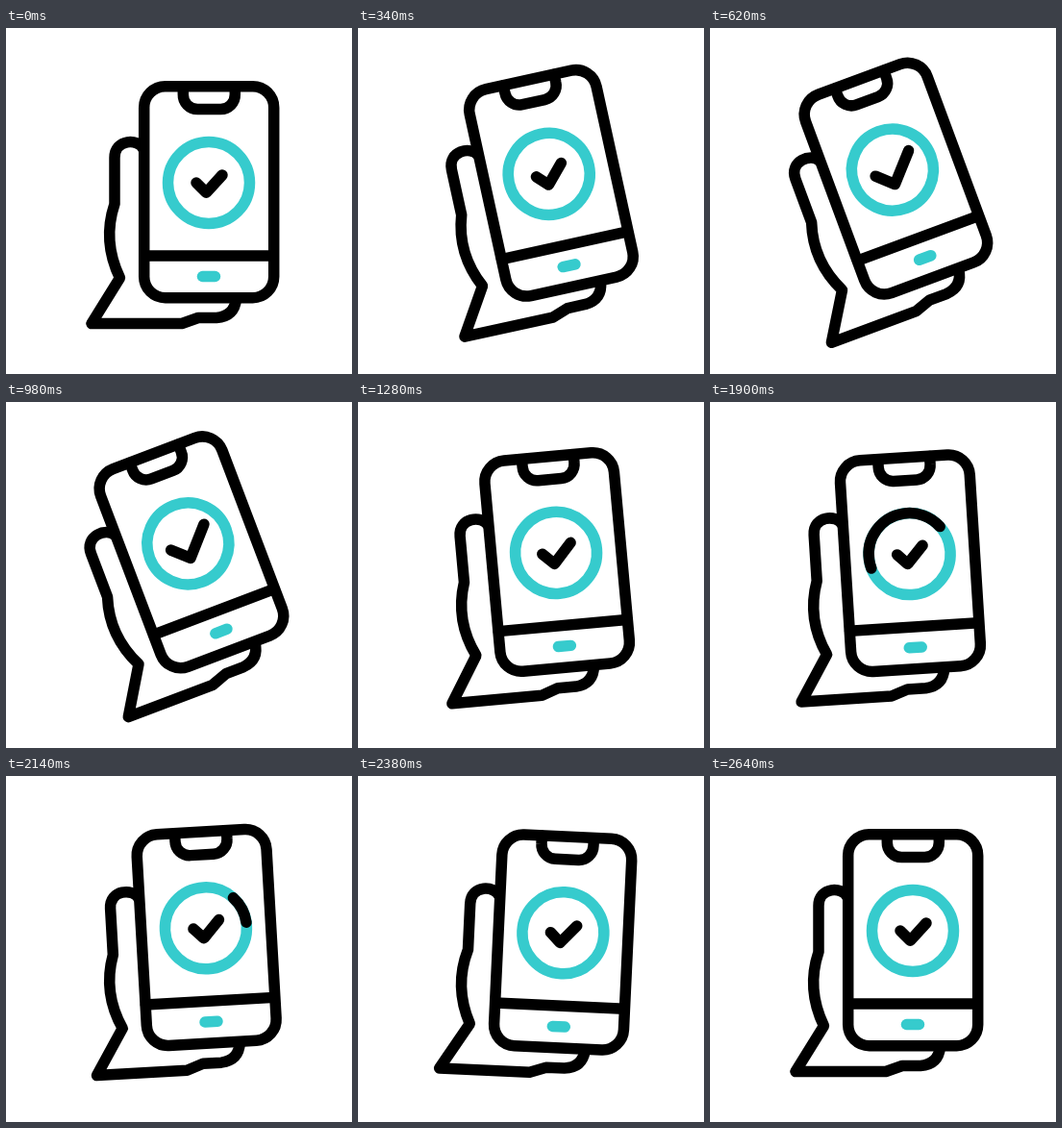
Animation of 360 by 360 pixels, one loop 2820 ms. Source, as an HTML page:

```html
<!DOCTYPE html>
<html lang="en">
<head>
<meta charset="utf-8">
<title>Phone in hand</title>
<style>
  html, body { margin: 0; height: 100%; overflow: hidden; background: #fff; }
  svg { display: block; width: 100%; height: 100%; }
  path, rect, circle { fill: none; stroke: #000; stroke-width: 11.5; stroke-linecap: round; stroke-linejoin: round; }
  .teal { stroke: #36cbcd; }
  .screen { fill: #fff; }
</style>
</head>
<body>
<svg viewBox="0 0 360 360">
  <g id="device">
    <path d="M143 126C138 115 113 115 113 135V183Q100 222 118.500 260L89 307.500H183L200 301.500H219Q237.500 300 239.500 282"/>
    <rect class="screen" x="143.700" y="60.700" width="135" height="220" rx="22"/>
    <path d="M184.300 61V69A15 15 0 0 0 199.300 84.500H223.300A15 15 0 0 0 238.300 69V61M144 237H278"/>
    <path class="teal" d="M204.500 258.500H217.500"/>
    <circle class="teal" cx="211" cy="161" r="42.500"/>
    <circle id="arc" cx="211" cy="161" r="42.500" pathLength="100" transform="rotate(-5 211 161)"/>
    <path id="check"/>
  </g>
</svg>
<script>
const LOOP = 2820;
const device = document.getElementById('device');
const arc = document.getElementById('arc');
const check = document.getElementById('check');

const smooth = u => u * u * (3 - 2 * u);
const easeOut = u => u * (2 - u);

// Each key is [time, value, easing into the key].
function track(keys, t) {
  if (t <= keys[0][0]) return keys[0][1];
  for (let i = 1; i < keys.length; i++) {
    const [t0, v0] = keys[i - 1];
    const [t1, v1, ease = smooth] = keys[i];
    if (t < t1) return v0 + (v1 - v0) * ease((t - t0) / (t1 - t0));
  }
  return keys[keys.length - 1][1];
}

const tilt = [[210, 0], [560, -20.3, easeOut], [1016, -20.8], [1608, 16.2], [1994, -7], [2345, 2.8], [2640, 0]];
const growth = [[270, 0], [640, 1], [1010, 1], [1400, 0]];
const arcHead = [[1284, 0], [2044, 100]];
const arcTail = [[1538, 0], [2298, 100]];

const smallCheck = [[198, 161], [208.3, 171.3], [225, 153]];
const bigCheck = [[192, 161], [208.2, 176], [233.7, 148]];

function draw(t) {
  device.setAttribute('transform', `rotate(${track(tilt, t)} 163 213.2)`);

  const k = track(growth, t);
  const points = smallCheck.map((p, i) => p.map((v, j) => v + (bigCheck[i][j] - v) * k));
  check.setAttribute('d', 'M' + points.join('L'));

  const start = track(arcTail, t);
  const length = track(arcHead, t) - start;
  arc.style.display = length > 0 ? '' : 'none';
  arc.style.strokeDasharray = `${length} 200`;
  arc.style.strokeDashoffset = -start;
}

function tick() {
  draw(performance.now() % LOOP);
  requestAnimationFrame(tick);
}
tick();
</script>
</body>
</html>
```
